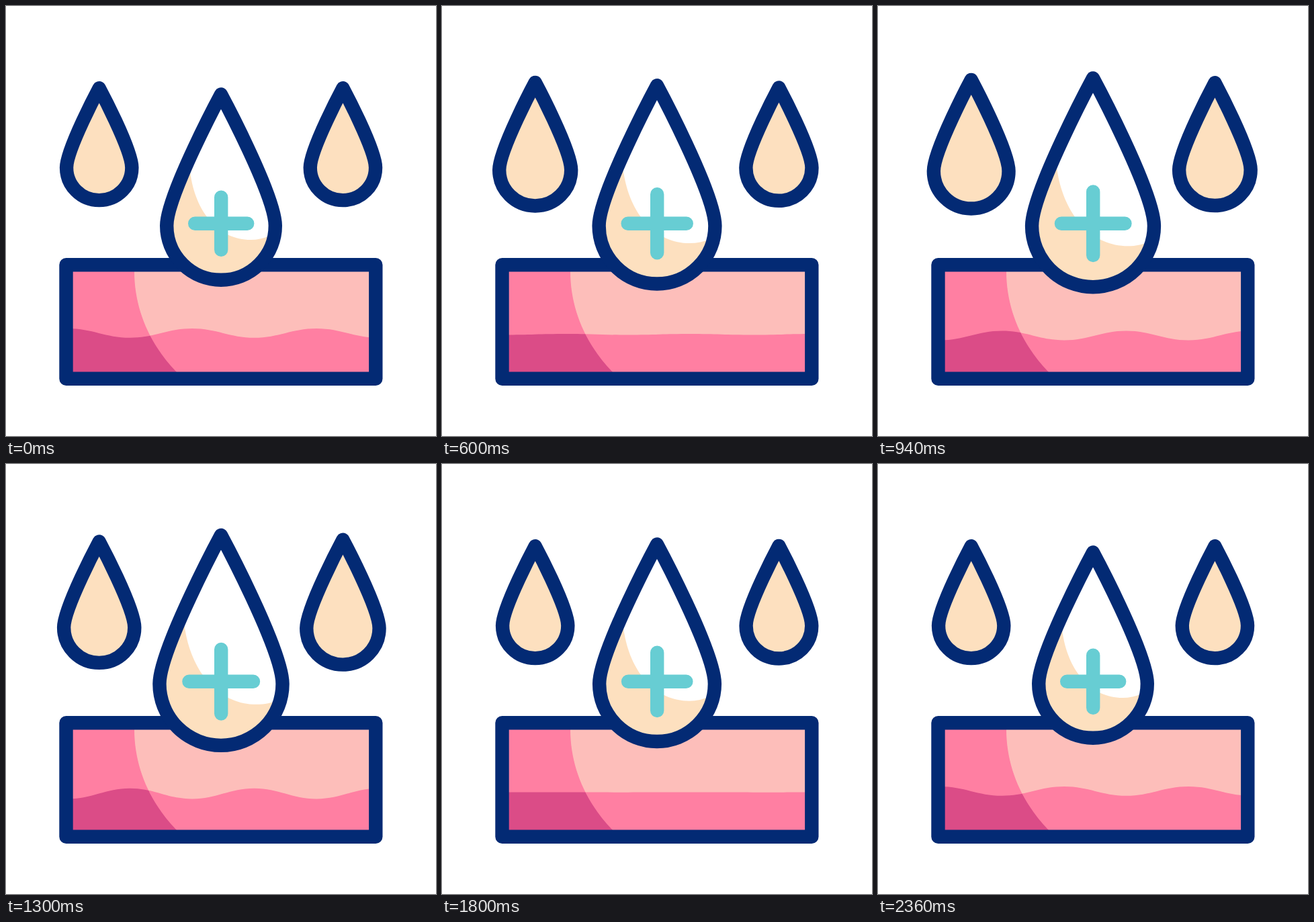
Animation of 640x640 px, one loop 2400 ms. Source, as an HTML page:

```html
<!DOCTYPE html>
<html lang="en">
<head>
<meta charset="utf-8">
<title>Skin drops</title>
<style>
  html, body { margin: 0; width: 100%; height: 100%; overflow: hidden; background: #fff; }
  svg { display: block; width: 100%; height: 100%; }
  .line { fill: none; stroke: #032a74; stroke-width: 20.4; stroke-linejoin: round; }
  .cream { fill: #fde0bf; }
  .plus { fill: none; stroke: #67cdd3; stroke-width: 20.4; stroke-linecap: round; }
</style>
</head>
<body>
<svg viewBox="0 0 640 640">
  <defs>
    <clipPath id="skin"><rect x="89.5" y="385.3" width="460.8" height="169.4"/></clipPath>
    <clipPath id="shade"><path d="M80 380H191V395C191 452 215 505 254 545L264 555H80Z"/></clipPath>
    <clipPath id="inside"><path id="clipDrop"/></clipPath>
  </defs>

  <g clip-path="url(#skin)">
    <rect x="80" y="380" width="480" height="180" fill="#fdbeba"/>
    <path class="wave" fill="#ff7fa2"/>
    <g clip-path="url(#shade)">
      <rect x="80" y="380" width="480" height="180" fill="#ff7fa2"/>
      <path class="wave" fill="#db4c87"/>
    </g>
  </g>
  <rect class="line" x="89.5" y="385.3" width="460.8" height="169.4"/>

  <path id="left" class="line" style="fill:#fde0bf"/>
  <path id="right" class="line" style="fill:#fde0bf"/>

  <path id="fill" class="cream"/>
  <g clip-path="url(#inside)">
    <path id="shine" fill="#fff" d="M274 246C281 306 316 348 364 348C374 348 383 346 392 342L440 310V60H230Z"/>
  </g>
  <path id="plus" class="plus"/>
  <path id="main" class="line"/>
</svg>
<script>
const LOOP = 2400;
const $ = id => document.getElementById(id);
const waves = document.querySelectorAll('.wave');

// Symmetric ease: cubic-bezier(.5, 0, .5, 1)
function ease(x) {
  if (x <= 0) return 0;
  if (x >= 1) return 1;
  let lo = 0, hi = 1;
  for (let i = 0; i < 24; i++) {
    const m = (lo + hi) / 2;
    if (1.5 * m * (1 - m) + m * m * m < x) lo = m; else hi = m;
  }
  return lo * lo * (3 - 2 * lo);
}

// Rises from start to peak, falls back by end
const pulse = (t, start, peak, end) =>
  t < peak ? ease((t - start) / (peak - start)) : ease((end - t) / (end - peak));

const mix = (a, b, f) => a + (b - a) * f;

// Drop outline scaled by s about (cx, cy)
function drop({ cx, cy, r, tip, belly }, s) {
  const y = v => cy + (v - cy) * s;
  const R = r * s, top = y(tip), mid = y(belly), bend = mix(top, mid, 0.77);
  return `M${cx} ${top}C${cx} ${top} ${cx + R} ${bend} ${cx + R} ${mid}` +
    `A${R} ${R} 0 0 1 ${cx - R} ${mid}C${cx - R} ${bend} ${cx} ${top} ${cx} ${top}Z`;
}

function wave(f) {
  const step = 92.5, ctrl = step * 0.4;
  const ys = [mix(480, 498.7, f), mix(493.8, 482.6, f)];
  let x = 92 - step, d = `M${x} ${ys[1]}`;
  for (let i = 0; i < 7; i++) {
    const a = ys[(i + 1) % 2], b = ys[i % 2];
    d += `C${x + ctrl} ${a} ${x + step - ctrl} ${b} ${x + step} ${b}`;
    x += step;
  }
  return d + `V570H${92 - step}Z`;
}

const side = cx => ({ cx, cy: 205.7, r: 48.65, tip: 122.2, belly: 240.5 });
const LEFT = side(138.7), RIGHT = side(501.4);
const MAIN = { cx: 320, cy: 324.5, r: 80.8, tip: 131.6, belly: 327 };

function draw(t) {
  const f = pulse(t, 0, 1188, 2372);
  const outline = drop(MAIN, 1 + 0.135 * f);
  for (const id of ['main', 'fill', 'clipDrop']) $(id).setAttribute('d', outline);

  const k = 1 + 0.2 * f;
  $('shine').setAttribute('transform', `translate(320 298) scale(${k}) translate(-320 -298)`);

  const arm = mix(39, 47.9, f);
  $('plus').setAttribute('d',
    `M${320.2 - arm} 323.8H${320.2 + arm}M320.2 ${323.8 - arm}V${323.8 + arm}`);

  $('left').setAttribute('d', drop(LEFT, 1 + 0.148 * pulse(t, 140, 920, 1720)));
  $('right').setAttribute('d', drop(RIGHT, 1 + 0.118 * pulse(t, 450, 1180, 1910)));

  const d = wave(f);
  waves.forEach(w => w.setAttribute('d', d));
}

const began = performance.now();
function tick() {
  draw((performance.now() - began) % LOOP);
  requestAnimationFrame(tick);
}
tick();
</script>
</body>
</html>
```
